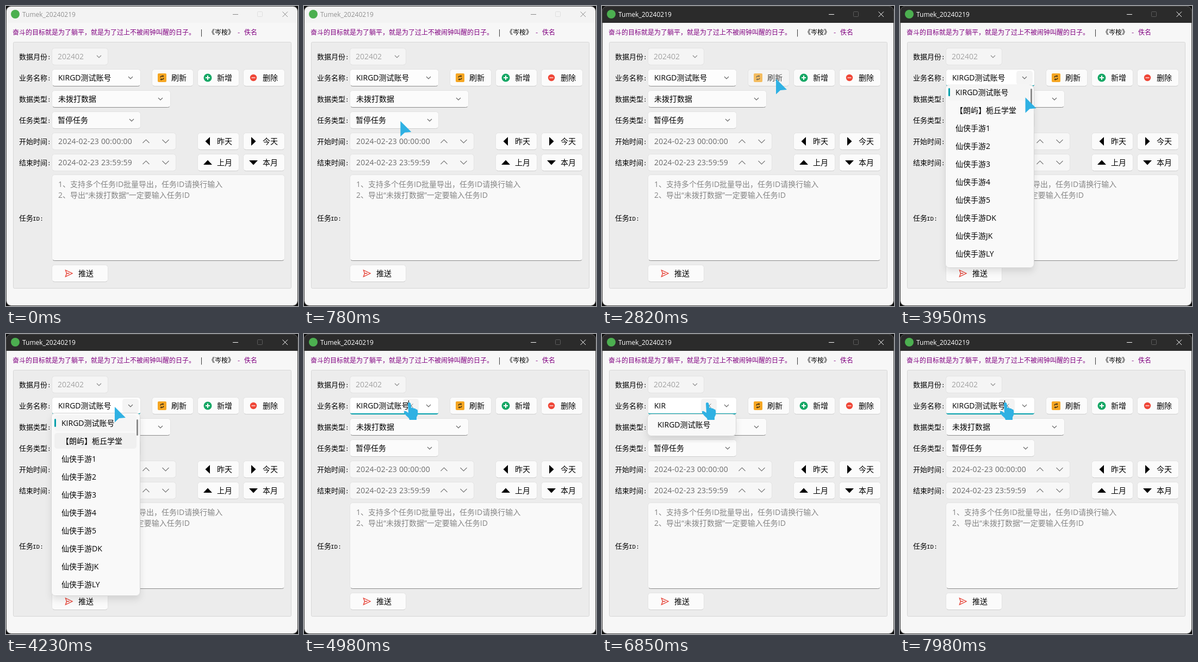
Recreate the animation shown at these times as an HTML page. Size 537 by 552 pixels, loop 8000 ms.

```html
<!DOCTYPE html>
<html lang="zh-CN">
<head>
<meta charset="utf-8">
<title>Tumek</title>
<style>
html, body { margin: 0; width: 100%; height: 100%; overflow: hidden; background: #0c0c0c; }
svg { display: block; width: 537px; height: 552px; }
text { font: 14px "Open Sans", "Noto Sans CJK SC", "Noto Sans CJK", sans-serif; white-space: pre; }
.label { font-size: 13px; }
.mono { font: 11px "Liberation Mono", monospace; }
.quote { font: 12px "Noto Sans CJK SC", "Noto Sans CJK", sans-serif; }
.title { font-size: 12px; }
.date { letter-spacing: .2px; }
</style>
</head>
<body>
<svg id="stage" viewBox="0 0 537 552" xmlns="http://www.w3.org/2000/svg"></svg>
<script>
const LOOP = 8000;
const NAME = 'KIRGD测试账号';
const ITEMS = [NAME, '【朗屿】栀丘学堂', ...['1', '2', '3', '4', '5', 'DK', 'JK', 'LY'].map(s => '仙侠手游' + s)];
const TEAL = '#009faa', BLUE = '#2fb1e3';
const stage = document.getElementById('stage');

const text = (x, y, s, fill = '#000', cls = '', id = '') =>
  `<text x="${x}" y="${y}" fill="${fill}" class="${cls}"${id && ` id="${id}"`}>${s}</text>`;
const line = (d, color, w = 1, id = '') =>
  `<path d="${d}" fill="none" stroke="${color}" stroke-width="${w}"${id && ` id="${id}"`}/>`;
const shape = (d, fill) => `<path d="${d}" fill="${fill}"/>`;
const box = (x, y, w, h, r, fill, stroke = 'none', id = '') =>
  `<rect x="${x}" y="${y}" width="${w}" height="${h}" rx="${r}" fill="${fill}" stroke="${stroke}"${id && ` id="${id}"`}/>`;
const chevron = (x, y, color, size = 4, dir = 1) =>
  line(`M${x - size} ${y - dir * size / 2}l${size} ${dir * size}l${size} ${-dir * size}`, color, 1.1);

// Rounded control with a separately tinted bottom edge
const field = (x, y, w, h, fill, edge, id = '') =>
  box(x + .5, y + .5, w - 1, h - 1, 5, fill, '#e3e3e3', id) +
  line(`M${x + 2.5} ${y + h - 1.5}q1.5 1 3 1h${w - 11}q1.5 0 3 -1`, edge);

const label = (y, s) => text(24, y + 5, s, '#000', 'label') + text(76, y + 5, ':', '#000', 'mono');
const button = (x, y, s, icon, id = '') =>
  field(x, y, 77, 32, '#fbfbfb', '#cfcfcf', id && id + 'Box') +
  `<g${id && ` id="${id}"`}>${icon}${text(x + 36, y + 21, s)}</g>`;
const dateField = (y, s) =>
  field(84, y, 229, 32, '#f7f7f7', '#e3e3e3') + text(96, y + 21, s, '#6a6a6a', 'date') +
  chevron(257.5, y + 16, '#777', 6, -1) + chevron(293.5, y + 16, '#777', 6);

function popup(id, y, h, inner) {
  return `<clipPath id="${id}Clip"><rect id="${id}Cut" x="60" y="${y - 1}" width="215" height="0"/></clipPath>
    <g id="${id}" clip-path="url(#${id}Clip)"><g filter="url(#soft)">${box(83.5, y + .5, 163, h, 7, '#f9f9f9', '#d6d6d6')}</g>
    <g id="${id}Body">${inner}</g></g>`;
}

const refresh = box(279, 124, 16, 16, 2, '#f5a623') +
  line('M284 131.5q.5 -2.5 3 -2.5h1.5M290 132.5q-.5 2.5 -3 2.5h-1.500', '#3a2c12', 1.3) +
  shape('M288 127l2.5 2l-2.5 2zM286 133l-2.5 2l2.5 2z', '#3a2c12');
const plus = '<circle cx="371" cy="132" r="7.5" fill="#16a765"/>' + line('M367 132h8M371 128v8', '#fff', 2);
const minus = '<circle cx="455" cy="132" r="6.2" fill="#ef4637"/>' + line('M451.5 132h7', '#fbd5d0', 1.6);

const list = box(89, 149, 151, 30, 5, '#f5f5f5') + box(89, 182, 151, 29, 5, '#f0f0f0', 'none', 'rowHover') +
  box(89, 156, 3, 15, 1.5, TEAL) +
  ITEMS.map((s, i) => text(102, 169 + 33 * i, s)).join('') +
  box(240, 157, 3, 30, 1.5, '#8c8c8c');
const match = text(102, 172, NAME) + box(89, 160, 3, 15, 1.5, TEAL, 'none', 'mark');

stage.innerHTML = `
<defs>
  <clipPath id="win"><rect x="1" y="1" width="535" height="550" rx="8"/></clipPath>
  <filter id="soft" x="-20%" y="-20%" width="140%" height="150%">
    <feDropShadow dx="0" dy="7" stdDeviation="6" flood-color="#000" flood-opacity=".1"/>
  </filter>
</defs>
<rect width="537" height="552" fill="#0c0c0c"/>
<g clip-path="url(#win)">
  <rect width="537" height="552" fill="#f7f7f7"/>
  <rect id="bar" width="537" height="31"/>
</g>
${box(.5, .5, 536, 551, 8.5, 'none', '#444')}
<circle cx="17" cy="15" r="8" fill="#4caf50"/>
${text(30, 20, 'Tumek_20240219', '#999', 'title', 'title')}
${line('M417 15.5h10M508.5 10.5l9.5 9.5M518 10.5l-9.5 9.5', '#888', 1, 'winIcons')}
${box(462.5, 10.5, 9, 9, 1, 'none', '#ddd', 'maxIcon')}
${text(12, 53, '奋斗的目标就是为了躺平，就是为了过上不被闹钟叫醒的日子。', '#800080', 'quote')}
${text(358, 53, '|', '#000', 'quote')}${text(372, 53, '《岑桉》', '#000', 'quote')}
${text(426, 53, '-', '#800080', 'quote')}${text(438, 53, '佚名', '#800080', 'quote')}
${box(13.5, 66.5, 511, 453, 2, '#ececec', '#d7d7d7')}
${label(93, '数据月份')}${label(132, '业务名称')}${label(171, '数据类型')}
${label(210, '任务类型')}${label(249, '开始时间')}${label(288, '结束时间')}
${text(24, 395, '任务', '#000', 'label')}${text(49, 395, 'ID:', '#000', 'mono')}
${field(84, 77, 104, 32, '#f5f5f5', '#e3e3e3')}${text(95, 98, '202402', '#a3a3a3')}${chevron(171, 93, '#8a8a8a')}
${field(84, 116, 164, 32, '#fdfdfd', '#8c8c8c', 'combo')}
${box(214, 119, 30, 26, 5, '#ededed', 'none', 'dropHover')}
${box(182, 119, 29, 26, 5, '#f3f3f3', 'none', 'clearHover')}
${text(96, 137, NAME, '#000', '', 'entry')}
${line('M193.5 128.5l7 7M200.5 128.5l-7 7', '#777', 1, 'clearIcon')}
${chevron(229, 132, '#666')}
<path id="focus" d="M84.5 144.5q1 3.5 4.5 3.5h154q3.5 0 4.5 -3.5q-.5 1.5 -4.5 1.5h-154q-4 0 -4.5 -1.5z" fill="${TEAL}"/>
<rect id="caret" y="122" width="1" height="19"/>
${button(268, 116, '刷新', refresh, 'refresh')}
${button(352, 116, '新增', plus)}
${button(436, 116, '删除', minus)}
${field(84, 155, 219, 32, '#fbfbfb', '#8c8c8c')}${text(96, 176, '未拨打数据')}${chevron(284, 171, '#666')}
${field(84, 194, 164, 32, '#fbfbfb', '#cfcfcf')}${text(95, 215, '暂停任务')}${chevron(231, 210, '#666')}
${dateField(233, '2024-02-23 00:00:00')}
${dateField(272, '2024-02-23 23:59:59')}
${button(352, 233, '昨天', shape('M375 241v16l-8.5 -8z', '#000'))}
${button(436, 233, '今天', shape('M451 241v16l8.5 -8z', '#000'))}
${button(352, 272, '上月', shape('M363 292h16l-8 -8.5z', '#000'))}
${button(436, 272, '本月', shape('M447 284h16l-8 8.5z', '#000'))}
${field(84, 310, 429, 159, '#f9f9f9', '#8c8c8c')}
${text(96, 333, '1、支持多个任务ID批量导出，任务ID请换行输入', '#858585')}
${text(96, 353, '2、导出“未拨打数据”一定要输入任务ID', '#858585')}
${field(84, 476, 104, 32, '#fbfbfb', '#cfcfcf')}
${line('M109.5 486l12.5 6l-12.5 6l2 -6zM111.5 492h5', '#e5392d', 1.3)}${text(133, 497, '推送')}
${popup('menu', 145, 336, list)}
${popup('hint', 147, 40, match)}
<path id="arrow" d="M0 0V28.5L8 21L20 20Z" fill="${BLUE}"/>
<path id="hand" d="M-2 -2Q-2 -4 .5 -4Q3 -4 3.5 -1L4.5 6Q7 4.5 9 7Q11 6 13 8.5Q16 8 16 11Q17.5 18 14 23L14 28H1L0 25Q-6 20 -9 15Q-10 11 -6 12L-1 15Z" fill="${BLUE}"/>`;

const el = {};
stage.querySelectorAll('[id]').forEach(n => el[n.id] = n);

// Pointer track: time, x, y
const TRACK = [
  [270, 150, 540], [1020, 186, 108], [1530, 186, 108], [1720, 222, 129], [2000, 320, 137],
  [2339, 320, 137], [2340, 320, 134], [3020, 320, 134], [3180, 241, 136], [3330, 241, 136],
  [3380, 239, 138], [3800, 239, 138], [4050, 225, 188], [4230, 200, 134], [4470, 187, 127],
  [4600, 187, 127], [4650, 193, 130], [LOOP, 193, 130]
];

function pointerAt(t) {
  const i = Math.max(1, TRACK.findIndex(k => k[0] > t));
  const [a, b] = [TRACK[i - 1], TRACK[i]];
  const p = Math.min(1, Math.max(0, (t - a[0]) / (b[0] - a[0])));
  const k = i === 1 ? p * p * (3 - 2 * p) : p;
  return [a[1] + (b[1] - a[1]) * k, a[2] + (b[2] - a[2]) * k];
}

function entryAt(t) {
  if (t < 5070 || t >= 7930) return NAME;
  if (t < 6440) return '';
  return NAME.slice(0, t < 6600 ? 1 : t < 6850 ? 2 : 3);
}

const show = (node, on) => node.setAttribute('display', on ? 'inline' : 'none');
const within = (t, a, b) => t >= a && t < b;
const set = (node, attr, v) => node.setAttribute(attr, v);

function drop(id, t, from, to, length, height) {
  const on = within(t, from, to);
  show(el[id], on);
  if (!on) return;
  const k = 1 - (1 - Math.min(1, (t - from + 30) / length)) ** 3;
  set(el[id + 'Cut'], 'height', k * (height + 30));
  set(el[id + 'Body'], 'transform', `translate(0 ${(k - 1) * height})`);
}

function draw(t) {
  const active = t >= 2820, pressed = within(t, 2820, 3020);
  set(el.bar, 'fill', active ? '#2b2b2b' : '#f3f3f3');
  set(el.title, 'fill', active ? '#fff' : '#929292');
  set(el.winIcons, 'stroke', active ? '#fff' : '#888');
  set(el.maxIcon, 'stroke', active ? '#5c5c5c' : '#dedede');
  set(el.refreshBox, 'fill', pressed ? '#f4f4f4' : '#fbfbfb');
  set(el.refresh, 'opacity', pressed ? .7 : 1);

  const [x, y] = pointerAt(t);
  const menuOpen = within(t, 3770, 4930);
  const overDrop = x >= 214 && x <= 243 && y >= 119 && y <= 145;
  const overClear = t >= 4930;
  const hand = overDrop && !menuOpen || overClear;
  show(el.arrow, t >= 270 && !hand);
  show(el.hand, hand);
  for (const c of [el.arrow, el.hand]) set(c, 'transform', `translate(${x} ${y})`);

  const focused = t >= 3770;
  const hovered = x < 248 && y >= 116 && y < 148;
  set(el.combo, 'fill', focused ? '#fff' : hovered ? '#f8f8f8' : '#fdfdfd');
  show(el.focus, focused);
  show(el.dropHover, overDrop && !overClear || menuOpen);
  set(el.dropHover, 'fill', menuOpen ? '#f4f4f4' : '#ededed');

  const value = entryAt(t);
  el.entry.textContent = value;
  show(el.clearHover, overClear && value);
  show(el.clearIcon, overClear && value);

  const hinting = within(t, 6490, 7930);
  const blinkOff = within(t, 5510, 6020);
  show(el.caret, t >= 4930 && !hinting && !blinkOff);
  set(el.caret, 'x', value === NAME ? 192 : value ? 105 : 96);

  drop('menu', t, 3770, 4930, 280, 336);
  show(el.rowHover, t >= 4000);
  drop('hint', t, 6490, 7930, 200, 40);
  show(el.mark, t >= 7650);
}

function tick() {
  draw(performance.now() % LOOP);
  requestAnimationFrame(tick);
}
tick();
</script>
</body>
</html>
```
